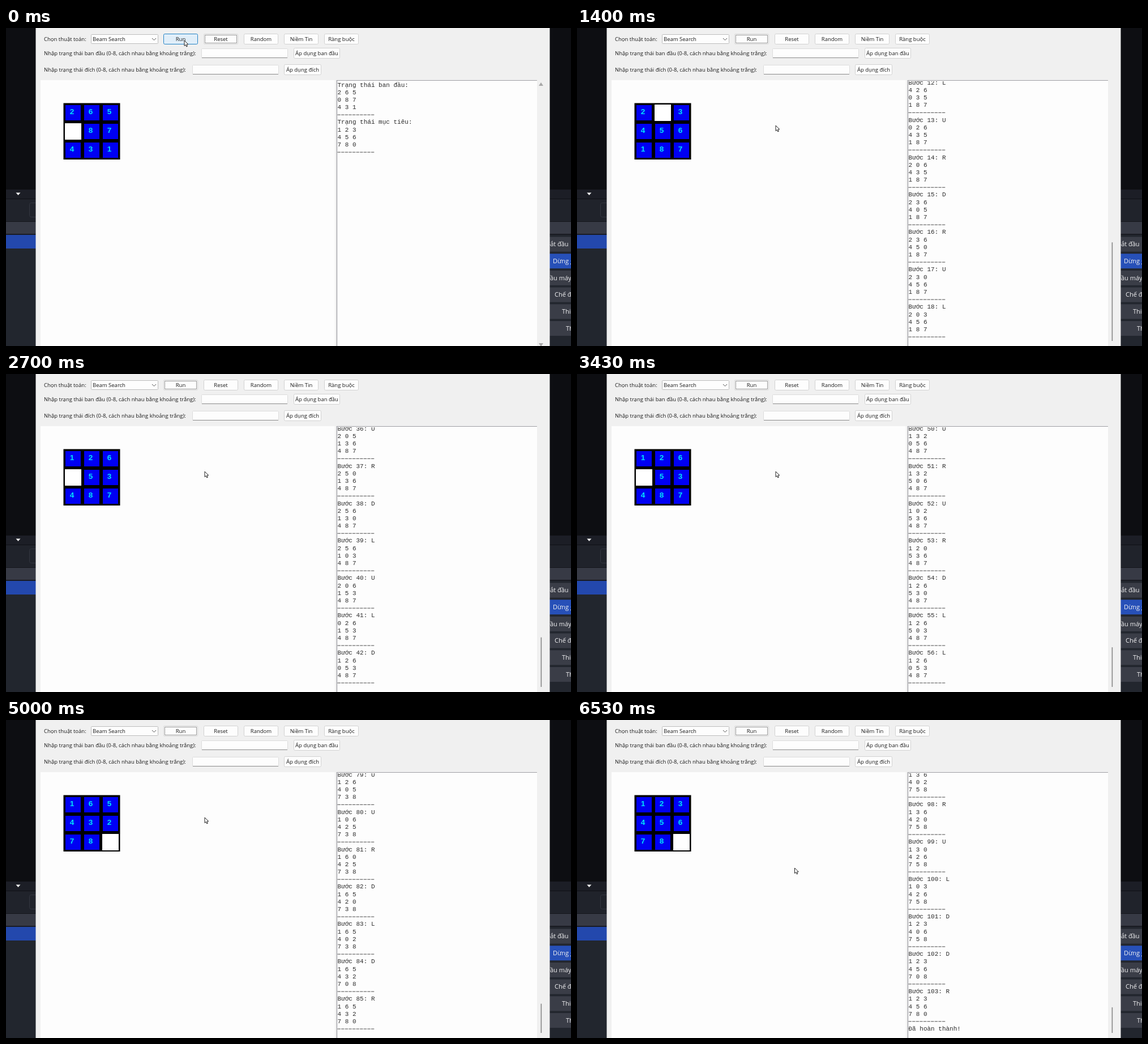
Write an HTML page with a canvas that moves like this. It is 998 px wide and 561 px high and loops after 6.56 s.

```html
<!DOCTYPE html>
<html lang="vi">
<head>
<meta charset="utf-8">
<style>
html, body { margin: 0; width: 998px; height: 561px; overflow: hidden; background: #f0f0f0; }
canvas { display: block; }
</style>
</head>
<body>
<canvas width="998" height="561"></canvas>
<script>
const ctx = document.querySelector('canvas').getContext('2d');
const LOOP = 6560, FIRST = 427, STEP = 53.33, LINE = 13.19;
const UI = '9.5px "Open Sans", "Noto Sans", sans-serif';
const DARK_UI = '11px "Open Sans", "Noto Sans", sans-serif';
const MONO = '11px "Liberation Mono", "Courier New", monospace';
const DIGIT = 'bold 13.6px "Liberation Sans", Arial, sans-serif';

// Sliding puzzle: a board is a string of nine digits, 0 is the gap.
const SHIFT = { U: -3, D: 3, L: -1, R: 1 };
const BACK = { U: 'D', D: 'U', L: 'R', R: 'L' };
const START = '265087431', GOAL = '123456780';

function slide(board, move) {
  const a = board.indexOf('0'), b = a + SHIFT[move];
  if (b < 0 || b > 8 || (Math.abs(SHIFT[move]) === 1 && (a / 3 | 0) !== (b / 3 | 0))) return null;
  const cells = [...board];
  [cells[a], cells[b]] = [cells[b], cells[a]];
  return cells.join('');
}

function distance(board, goal) {
  let sum = 0;
  for (const d of '12345678') {
    const a = board.indexOf(d), b = goal.indexOf(d);
    sum += Math.abs(a % 3 - b % 3) + Math.abs((a / 3 | 0) - (b / 3 | 0));
  }
  return sum;
}

// Finds a route of exactly n moves that never undoes its last move.
function route(board, goal, n, last) {
  if (n === 0) return board === goal ? '' : null;
  if (distance(board, goal) > n) return null;
  for (const move of 'RDLU') {
    if (move === BACK[last]) continue;
    const next = slide(board, move);
    const rest = next && route(next, goal, n - 1, move);
    if (rest !== null) return move + rest;
  }
  return null;
}

const boards = [START];
let moves = '';
function play(path) {
  for (const move of path || '') {
    boards.push(slide(boards[boards.length - 1], move));
    moves += move;
  }
}
const legs = [
  'DRRUULL', ['423156087', 14],
  'RRULLUR', ['132456087', 21],
  'URURDLL', ['412086753', 12],
  'URRDDLU', ['153460782', 15],
  'LURDDLURULDDR'
];
for (const leg of legs) {
  play(typeof leg === 'string' ? leg
    : route(boards[boards.length - 1], leg[0], leg[1], moves[moves.length - 1]));
}

const rows = board => [0, 3, 6].map(i => [...board.slice(i, i + 3)].join(' '));
const RULE = '----------';
const log = ['Trạng thái ban đầu:', ...rows(START), RULE, 'Trạng thái mục tiêu:', ...rows(GOAL), RULE];
[...moves].forEach((move, i) => log.push(`Bước ${i + 1}: ${move}`, ...rows(boards[i + 1]), RULE));
log.push('Đã hoàn thành!');

function box(x, y, w, h, fill) {
  ctx.fillStyle = fill;
  ctx.fillRect(x, y, w, h);
}

function text(str, x, y, font, fill, align = 'left') {
  ctx.font = font;
  ctx.fillStyle = fill;
  ctx.textAlign = align;
  ctx.fillText(str, x, y);
}

function shape(points, fill, stroke) {
  ctx.beginPath();
  points.forEach(([x, y]) => ctx.lineTo(x, y));
  ctx.closePath();
  ctx.fillStyle = fill;
  ctx.fill();
  if (stroke) {
    ctx.strokeStyle = stroke;
    ctx.stroke();
  }
}

function frame(x, y, w, h, fill, stroke, radius = 2) {
  ctx.beginPath();
  ctx.roundRect(x + .5, y + .5, w - 1, h - 1, radius);
  ctx.fillStyle = fill;
  ctx.fill();
  ctx.strokeStyle = stroke;
  ctx.stroke();
}

function button(label, x, y, w, h, hover, focus) {
  frame(x, y, w, h, hover ? '#e0eef9' : '#fdfdfd', hover ? '#2583c5' : '#d2d2d2');
  if (focus) {
    ctx.setLineDash([1, 1]);
    ctx.strokeStyle = '#333';
    ctx.strokeRect(x + 2.5, y + 2.5, w - 5, h - 5);
    ctx.setLineDash([]);
  }
  text(label, x + w / 2, y + h / 2 + 3.7, UI, '#1c1c1c', 'center');
}

function entry(x, y, w) {
  frame(x, y, w, 17, '#fdfdfd', '#dcdcdc', 1);
  box(x + 1, y + 16, w - 2, 1, '#8a8a8a');
}

function backdrop() {
  box(0, 0, 998, 561, '#22262e');
  box(0, 0, 998, 285, '#0d0e12');
  box(0, 285, 998, 17, '#1c1e26');
  box(0, 301, 998, 1, '#0f1015');
  box(0, 302, 998, 39, '#20232b');
  box(0, 341, 998, 23, '#373a45');
  box(0, 341, 998, 1, '#14161c');
  box(0, 363, 998, 2, '#191b22');
  box(0, 365, 53, 24, '#2348ad');
  frame(41, 308, 30, 26, '#20232b', '#333640', 3);
  shape([[17.5, 290.5], [25.5, 290.5], [21.5, 295]], '#f4f4f4');
  const side = [['Bắt đầu', 954], ['Dừng ghi', 966], ['Đầu máy ảo', 953], ['Chế độ', 969], ['Thiết', 982], ['Thoát', 989]];
  side.forEach(([label, x], i) => {
    const y = 368.5 + i * 29.7;
    box(950, y, 48, 26, i === 1 ? '#2750b8' : '#3a3d47');
    text(label, x, y + 16.8, DARK_UI, '#f0f0f2');
  });
}

function controls(hover, clicked) {
  box(52.5, 0, 908, 561, '#f0f0f0');
  text('Chọn thuật toán:', 67, 23.2, UI, '#1c1c1c');
  frame(150, 11, 119, 17, '#fdfdfd', '#bdbdbd', 1);
  text('Beam Search', 153, 23.2, UI, '#1c1c1c');
  ctx.beginPath();
  ctx.moveTo(258, 18);
  ctx.lineTo(261.5, 21.5);
  ctx.lineTo(265, 18);
  ctx.strokeStyle = '#555';
  ctx.stroke();
  button('Run', 278, 10, 61, 19, hover, clicked);
  button('Reset', 349, 10, 61, 19, false, !clicked);
  button('Random', 420, 10, 61, 19);
  button('Niềm Tin', 491, 10, 61, 19);
  button('Ràng buộc', 562, 10, 61, 19);
  text('Nhập trạng thái ban đầu (0-8, cách nhau bằng khoảng trắng):', 67, 48, UI, '#1c1c1c');
  entry(345, 36, 153);
  button('Áp dụng ban đầu', 508, 35, 82, 19);
  text('Nhập trạng thái đích (0-8, cách nhau bằng khoảng trắng):', 67, 76.7, UI, '#1c1c1c');
  entry(329, 65, 153);
  button('Áp dụng đích', 491, 64, 66, 19);
}

function puzzle(board) {
  box(61, 92, 520, 469, '#fdfdfd');
  box(101.5, 132.5, 100, 99.5, '#000');
  [...board].forEach((d, i) => {
    const x = 104 + i % 3 * 33, y = 135 + (i / 3 | 0) * 33;
    if (d === '0') {
      box(x, y, 29, 29, '#fff');
    } else {
      box(x + 1, y + 1, 27, 27, '#0000f4');
      text(d, x + 12.5, y + 17, DIGIT, '#00e4fa', 'center');
    }
  });
}

function rule(x, y) {
  ctx.beginPath();
  ctx.moveTo(x, y);
  ctx.lineTo(x + 66, y);
  ctx.setLineDash([5.4, 1.2]);
  ctx.strokeStyle = '#4a4a4a';
  ctx.stroke();
  ctx.setLineDash([]);
}

function output(count, t) {
  box(584, 92, 354, 469, '#fdfdfd');
  box(584, 92, 354, 1, '#a0a0a4');
  box(584, 92, 1, 469, '#8a8a92');
  const scroll = Math.max(0, 100 + (count - 1) * LINE - 544.6);
  ctx.save();
  ctx.beginPath();
  ctx.rect(585, 94, 352, 467);
  ctx.clip();
  for (let i = Math.max(0, count - 36); i < count; i++) {
    const y = 100 + i * LINE - scroll;
    if (log[i] === RULE) rule(585.5, y + .4);
    else text(log[i], 585.5, y + 3.5, MONO, '#2c2c2c');
  }
  ctx.restore();
  if (scroll === 0) {
    shape([[941, 102], [949, 102], [945, 96]], '#a8a8a8');
    shape([[941, 556], [949, 556], [945, 562]], '#a8a8a8');
  } else {
    const thumb = t < 870 ? 443 : Math.min(443, 453 * 35.5 / (count + 1) + 14.6);
    box(944.6, 552 - thumb, 1.6, thumb, '#858585');
  }
}

const trail = [[0, 315, 22], [430, 315, 22], [800, 343, 152], [870, 343, 152], [1000, 351, 172],
  [6030, 351, 172], [6350, 384.5, 261], [LOOP, 384.5, 261]];

function pointer(t) {
  const i = trail.findIndex(p => p[0] > t), a = trail[i - 1], b = trail[i];
  const u = (t - a[0]) / (b[0] - a[0]), e = u * u * (3 - 2 * u);
  return [a[1] + (b[1] - a[1]) * e, a[2] + (b[2] - a[2]) * e];
}

function cursor(x, y) {
  const arrow = [[0, 0], [0, 9.5], [2.2, 7.6], [3.8, 11], [5.4, 10.2], [3.9, 7], [6.8, 6.8]];
  shape(arrow.map(([dx, dy]) => [x + dx, y + dy]), '#fff', '#222');
}

function draw(now) {
  const t = now % LOOP;
  const step = Math.max(0, Math.min(moves.length, Math.floor((t - FIRST) / STEP)));
  const done = t >= FIRST + STEP * (moves.length + 1);
  const [x, y] = pointer(t);
  ctx.lineWidth = 1;
  backdrop();
  controls(y < 29, t >= 200);
  puzzle(boards[step]);
  output(10 + step * 5 + (done ? 1 : 0), t);
  cursor(x, y);
  requestAnimationFrame(draw);
}
requestAnimationFrame(draw);
</script>
</body>
</html>
```
